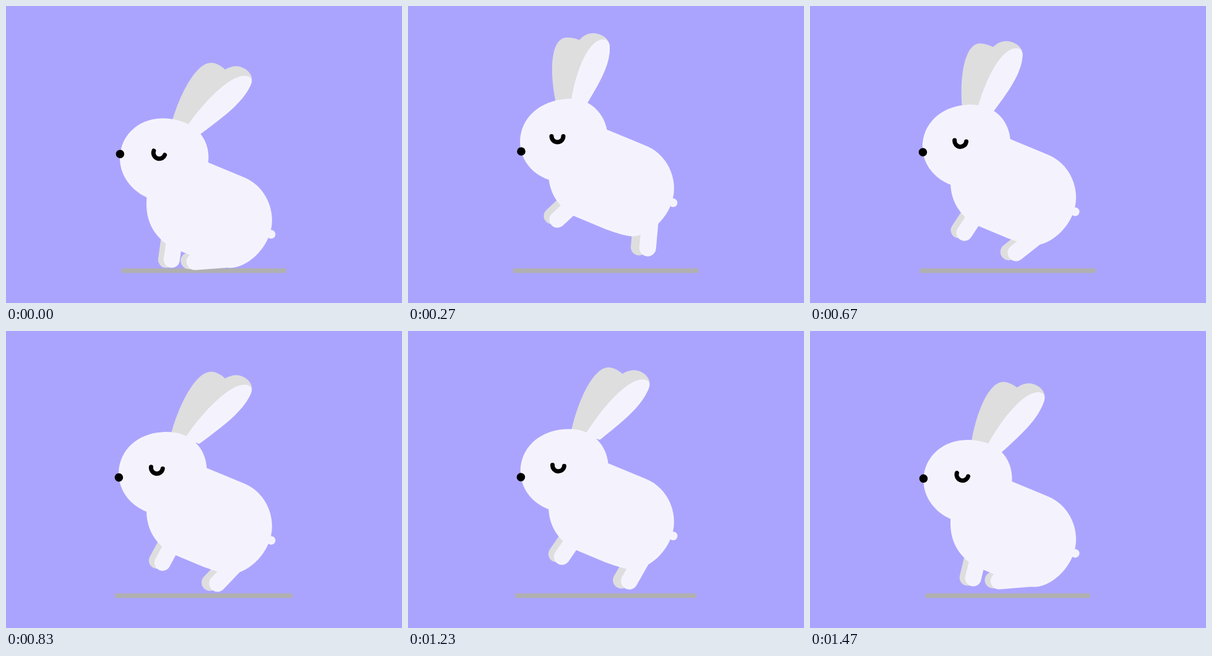
An HTML page that plays this animation: 640x480 px, repeating every 1.51 s.

```html
<!DOCTYPE html>
<html lang="en">
<head>
<meta charset="utf-8">
<title>Hopping rabbit</title>
<style>
  html, body { margin: 0; width: 100%; height: 100%; overflow: hidden; background: #aba4fe; }
  svg { display: block; width: 100vw; height: 100vh; }
  .fur { fill: #f4f3fd; }
  .shade { fill: #dedede; }
  .leg { stroke: #f4f3fd; stroke-linecap: round; }
  .leg.far { stroke: #dedede; }
  .hind { stroke-width: 27px; }
  .front { stroke-width: 26px; }
</style>
</head>
<body>
<svg viewBox="0 0 640 480">
  <rect id="ground" y="424" height="7.5" rx="3" fill="#b0b0b0"/>
  <line id="hindFar" class="leg far hind"/>
  <line id="frontFar" class="leg far front"/>
  <g id="ears">
    <path class="shade" d="M-24 3C-35 -42 -36 -106 -7 -106C2 -106 8 -104 13 -102C19 -109 26 -113 34 -113C48 -113 62 -105 62 -91C63 -62 46 -34 24 3Z"/>
    <path class="fur" d="M-1 3C4 -39 24 -103 52 -103C58 -103 62 -98 62 -91C63 -62 46 -34 24 3Z"/>
  </g>
  <line id="frontNear" class="leg front"/>
  <line id="hindNear" class="leg hind"/>
  <g id="body" class="fur">
    <path d="M227 320C227 350 240 372 265 389L320 412C340 419 355 424 366 423C392 421 430 388 430 346C430 316 412 288 385 277L327 253L280 235C245 245 227 280 227 320Z"/>
    <circle cx="428.5" cy="369" r="7"/>
  </g>
  <g id="head">
    <path class="fur" d="M-71 1C-71 -41 -34 -69 10 -69C46 -69 71 -41 71 -4C71 39 38 66 0 66C-35 66 -70 41 -71 1Z"/>
    <circle cx="-69" cy="16" r="6.8"/>
    <path d="M-20 -8.5a9.5 9.5 0 0 0 19 0" fill="none" stroke="#000" stroke-width="7" stroke-linecap="round"/>
  </g>
</svg>
<script>
const LOOP = 1510, STEP = 100 / 3, LAST = 44;
const HOP = 11, APEX = 8, LAND = 10.8, HEIGHT = 51;

const $ = id => document.getElementById(id);
const set = (id, attrs) => {
  for (const name in attrs) $(id).setAttribute(name, attrs[name]);
};
const clamp = u => Math.max(0, Math.min(1, u));
const wave = u => (1 - Math.cos(Math.PI * clamp(u))) / 2;

// Fast take-off easing into the apex, then a smooth drop; 0 to 1.
const rise = p => p < APEX
  ? 1 - (1 - p / APEX) ** 1.95
  : 1 - wave((p - APEX) / (LAND - APEX));

// Ears lag behind: they swing up before the apex and fold back on landing.
const fold = p => p < APEX
  ? 1 - wave((p - 3) / (APEX - 3))
  : wave((p - APEX) / (HOP - APEX));

// The last hop slows slightly after take-off.
function phase(t) {
  const i = Math.min(LAST, Math.floor((t + 4) / STEP));
  const turn = 3 * HOP + 4;
  return i > turn ? 4 + (i - turn) * 6 / 7 : i % HOP;
}

// A leg hangs from (x, y) at an angle below the horizontal, pointing left.
function drawLeg(name, x, y, length, angle, dx, dy) {
  const a = angle * Math.PI / 180;
  const x2 = x - length * Math.cos(a), y2 = y + length * Math.sin(a);
  set(name + 'Near', { x1: x, y1: y, x2, y2 });
  set(name + 'Far', { x1: x + dx, y1: y + dy, x2: x2 + dx, y2: y2 + dy });
}

function draw(t) {
  const p = phase(t), up = rise(p), lift = HEIGHT * up;
  const lead = rise(p + 0.3), kick = lead ** 3;
  const back = fold(p), drag = 0.85 * HEIGHT * (up + back - 1);
  const half = 132 + 18.5 * lead;

  set('ground', { x: 319.5 - half, width: 2 * half });
  set('body', { transform: `translate(0 ${-lift})` });
  set('head', {
    transform: `translate(${254.5 - 2.5 * up} ${249 - 30 * up}) rotate(${21 * (1 - up)})`
  });
  set('ears', {
    transform: `translate(${264 + 27 * back} ${157 + 41 * back - drag})
      rotate(${18 * back}) skewX(${-9 * back}) scale(1 ${1 + 0.08 * back})`
  });
  drawLeg('hind', 365 + 8 * lead + 20 * kick, 409.5 - 10 * lead - lift,
    62 - 20 * lead, 60 * lead + 29 * kick, -9 - 5 * lead, -1.5);
  drawLeg('front', 274, 366 - lift, 44.5, 82 - 26 * up - 13 * up * up, -9, -6 * up);
}

const start = performance.now();
function tick() {
  draw((performance.now() - start) % LOOP);
  requestAnimationFrame(tick);
}
tick();
</script>
</body>
</html>
```
